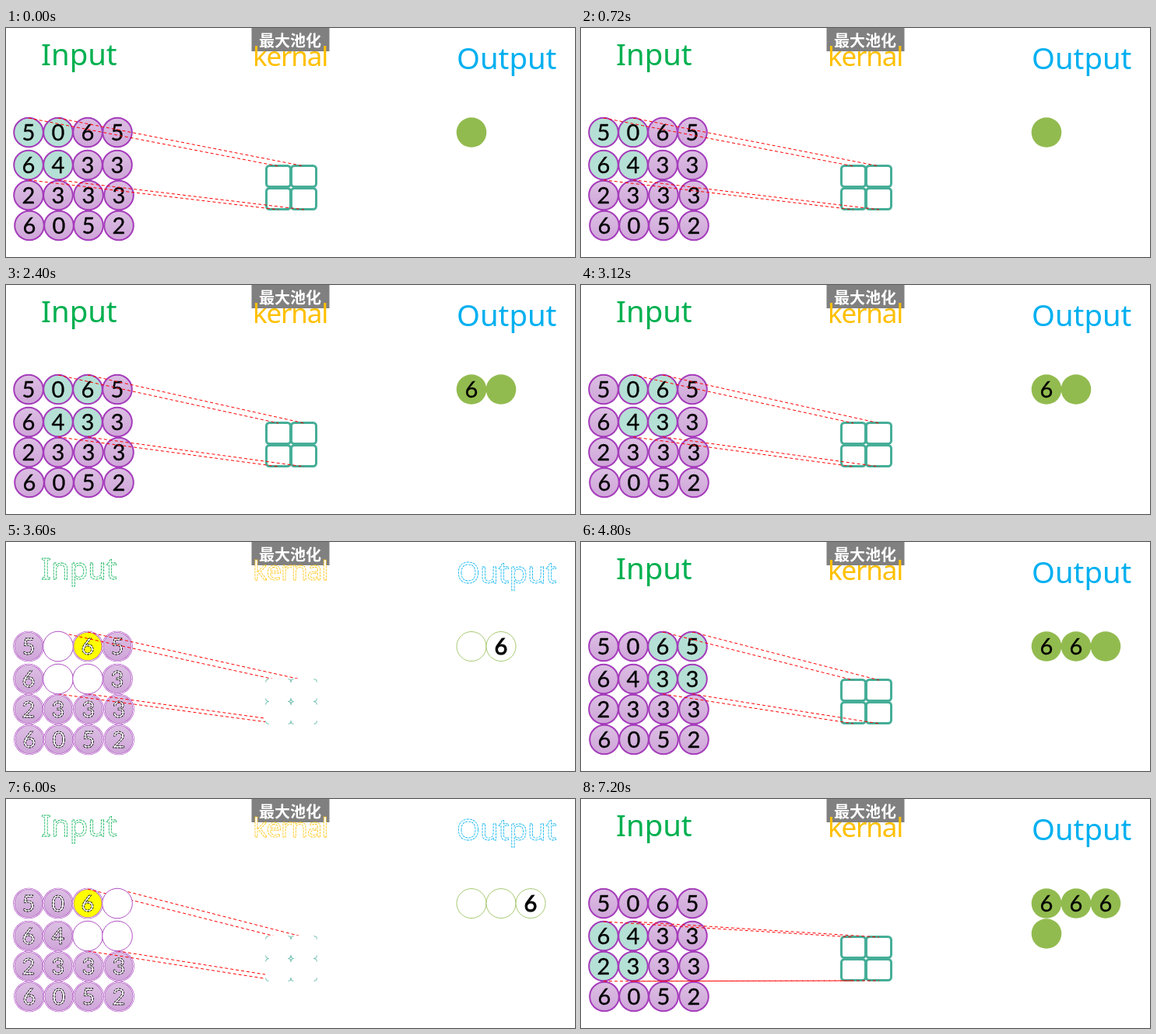
Write an HTML page that moves like this. It is 731 px wide and 295 px high and loops after 8000 ms.

```html
<!DOCTYPE html>
<html lang="en">
<head>
<meta charset="utf-8">
<title>Max pooling</title>
<style>
  html, body { margin: 0; width: 100%; height: 100%; overflow: hidden; background: #fff; }
  svg { display: block; }
  .title { font-family: "Noto Sans", "Open Sans", sans-serif; font-size: 38.3px; }
  .kernel { font-size: 35px; letter-spacing: -1.2px; }
  .digit { font-family: Lato, "Open Sans", sans-serif; font-size: 29px; text-anchor: middle; stroke: #000; stroke-width: .3px; }
  .label { font-family: "Noto Sans CJK SC", "Noto Sans CJK", sans-serif; font-size: 20px; font-weight: 700; fill: #fff; }
  .hollow { fill: #fff; stroke-width: .8px; stroke-dasharray: 3 1; }
  .strong { stroke-width: 1px; }
</style>
</head>
<body>
<svg width="731" height="295" viewBox="0 0 731 295">
  <defs>
    <linearGradient id="lilac" x1="0" y1="0" x2="0" y2="1">
      <stop offset="0" stop-color="#dcbfe3"/>
      <stop offset="1" stop-color="#cfa5d9"/>
    </linearGradient>
  </defs>
  <rect x="315.5" width="100" height="30" fill="#808080"/>
  <g id="scene"></g>
  <text class="label" x="325" y="23.5">最大池化</text>
</svg>
<script>
const scene = document.getElementById('scene');
const PURPLE = '#a53bbb', TEAL = '#46ae98', GREEN = '#92bb4f', MINT = '#b5e0d5';
const grid = ['5065', '6433', '2333', '6052'];
const colX = [[29, 67, 105, 143], [29, 67, 105, 143], [29, 67, 106, 145], [30, 68, 106, 145]];
const rowY = [134.5, 176.5, 215.5, 254.5];
const LOOP = 8000, STEP = 1200;

// window column and row, output index, cell holding the maximum, outlines only
const steps = [
  { c: 0, r: 0, out: 0 },
  { c: 0, r: 0, out: 0, max: [0, 1] },
  { c: 1, r: 0, out: 1 },
  { c: 1, r: 0, out: 1, max: [2, 0], ghost: true },
  { c: 2, r: 0, out: 2 },
  { c: 2, r: 0, out: 2, max: [2, 0], ghost: true },
  { c: 0, r: 1, out: 3 }
];

const circle = (x, y, r, fill, stroke = 'none', w = 0) =>
  `<circle cx="${x}" cy="${y}" r="${r}" fill="${fill}" stroke="${stroke}" stroke-width="${w}"/>`;

const digit = (x, y, s, look = '') =>
  `<text class="digit ${look}" x="${x}" y="${y + 10.5}">${s}</text>`;

function title(x, y, s, color, ghost, extra = '') {
  const paint = ghost ? `stroke="${color}"` : `fill="${color}"`;
  return `<text class="title ${extra}${ghost ? ' hollow' : ''}" x="${x}" y="${y}" ${paint}>${s}</text>`;
}

function cell(c, r, { c: wc, r: wr, max, ghost }) {
  const x = colX[r][c], y = rowY[r];
  const inside = c >= wc && c < wc + 2 && r >= wr && r < wr + 2;
  const isMax = max && max[0] === c && max[1] === r;
  if (ghost && inside && !isMax) return { blank: true, svg: circle(x, y, 19.3, '#fff', PURPLE, .9) };
  const fill = isMax ? '#ff0' : inside ? MINT : 'url(#lilac)';
  let svg = circle(x, y, 18.8, fill, PURPLE, 2);
  if (ghost) svg += circle(x, y, 18.8, 'none', '#fff', 1);
  return { svg: svg + digit(x, y, grid[r][c], ghost ? 'hollow' : '') };
}

function kernel(ghost) {
  let svg = '';
  for (const [x, w] of [[334.5, 31], [366.5, 32]])
    for (const y of [177.5, 206.5]) {
      if (!ghost) {
        svg += `<rect x="${x}" y="${y}" width="${w}" height="27" rx="4" fill="#fff" stroke="${TEAL}" stroke-width="3"/>`;
        continue;
      }
      const l = x - 1, t = y - 1, r = x + w + 1, b = y + 28;
      svg += `<path d="M${l} ${t + 4}q0-4 4-4M${r - 4} ${t}q4 0 4 4M${r} ${b - 4}q0 4-4 4M${l + 4} ${b}q-4 0-4-4" fill="none" stroke="${TEAL}" stroke-width=".8"/>`;
    }
  return svg;
}

function rays({ c, r }) {
  let d = '';
  for (const i of [0, 1]) {
    const x = colX[0][c + i], end = 350 + 33 * i;
    d += `M${x} ${rowY[r] - 18.5}L${end} 178M${x} ${rowY[r + 1] + 19.3}L${end} 234`;
  }
  return `<path d="${d}" fill="none" stroke="#f00" stroke-dasharray="4 3"/>`;
}

function outputs({ out, max, ghost }) {
  let svg = '';
  for (let i = 0; i <= out; i++) {
    const x = 598 + 38 * (i % 3), y = 134.5 + 39 * Math.floor(i / 3);
    svg += ghost ? circle(x, y, 19, '#fff', GREEN, .8) : circle(x, y, 19.3, GREEN);
    if (ghost ? i === out : i < out || max) svg += digit(x, y, 6, ghost ? 'strong' : '');
  }
  return svg;
}

function draw(step) {
  const { ghost } = step;
  let cells = '', blanks = '';
  for (let r = 0; r < 4; r++)
    for (let c = 0; c < 4; c++) {
      const { svg, blank } = cell(c, r, step);
      if (blank) blanks += svg; else cells += svg;
    }
  const mask = ghost ? '<rect x="333" y="176" width="67" height="59" fill="#fff"/>' : '';
  const box = kernel(ghost), lines = rays(step);
  scene.innerHTML =
    title(45, 48, 'Input', '#00b050', ghost) +
    title(317, 49, 'kernal', '#ffc000', ghost, 'kernel') +
    title(579, 53, 'Output', '#00b0f0', ghost) +
    cells + (ghost ? lines + mask + blanks + box : box + lines) + outputs(step);
}

let shown = -1;
const start = performance.now();
function tick(now) {
  const t = Math.max(0, now - start) % LOOP;
  const i = Math.min(steps.length - 1, Math.floor(t / STEP));
  if (i !== shown) draw(steps[shown = i]);
  requestAnimationFrame(tick);
}
tick(start);
</script>
</body>
</html>
```
